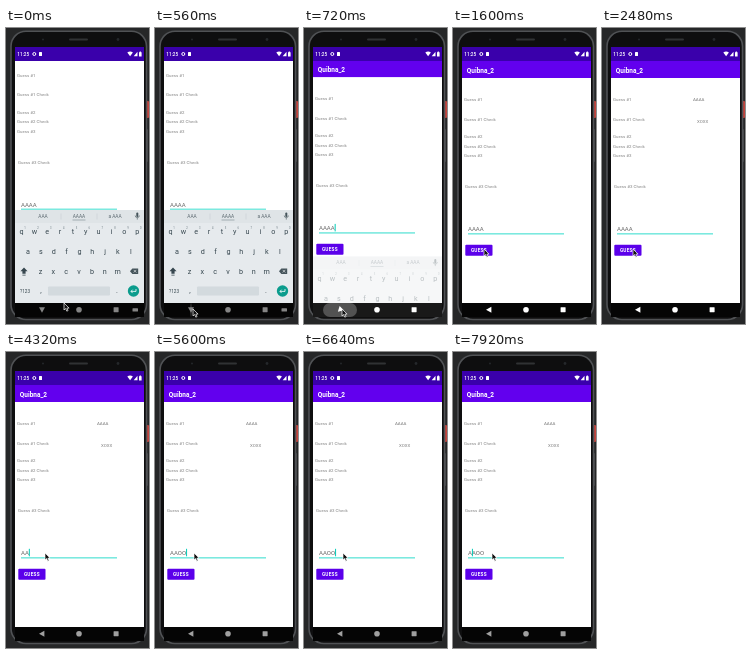
These frames come from a looping animation (143x296 px, 8 s). An HTML page:

```html
<!DOCTYPE html>
<html lang="en">
<head>
<meta charset="utf-8">
<title>Guessing app</title>
<style>
html, body { margin: 0; width: 100%; height: 100%; overflow: hidden; background: #262728; }
svg { display: block; width: 143px; height: 296px; font-family: Roboto, "Open Sans", sans-serif; }
text { white-space: pre; }
.label { font-size: 4.4px; fill: #808080; }
.key { font-size: 7.2px; fill: #37474f; text-anchor: middle; }
.hint { font-size: 2.6px; fill: #66757c; text-anchor: middle; }
.tip { font-size: 4.8px; fill: #546168; text-anchor: middle; }
</style>
</head>
<body>
<svg viewBox="0 0 143 296">
  <defs>
    <clipPath id="screen"><path d="M9 19H138V289H9Z"/></clipPath>
    <clipPath id="content"><path d="M9 33H138V275H9Z"/></clipPath>
    <clipPath id="buttonClip"><rect x="12.3" y="216.7" width="27.2" height="11" rx="1"/></clipPath>
  </defs>
  <rect width="143" height="296" fill="#262728"/>
  <rect x="139" y="73" width="4" height="17" rx="1" fill="#c5443d"/>
  <rect x="139" y="101" width="3" height="33" rx="1" fill="#46484a"/>
  <rect x="5" y="3.2" width="135.5" height="288.3" rx="15" fill="#0e0e0f" stroke="#505255" stroke-width="1.6"/>
  <rect x="63" y="10.5" width="19" height="2" rx="1" fill="#303234"/>
  <circle cx="37" cy="11.5" r="1" fill="#25282b"/>
  <circle cx="112" cy="11.5" r="1.4" fill="#25282b"/>

  <g clip-path="url(#screen)">
    <rect x="9" y="19" width="129" height="256" fill="#fff"/>
    <g clip-path="url(#content)">
      <g id="page">
        <rect x="9" y="31" width="129" height="19" fill="#6200ee"/>
        <text x="13.8" y="45" font-size="6.5" font-weight="700" fill="#fff">Quibna_2</text>
        <g id="labels"></g>
        <g id="answers">
          <text class="label" x="91" y="73.4">AAAA</text>
          <text class="label" x="95" y="94.9">XOXX</text>
        </g>
        <text id="entry" x="15" y="203" font-size="6" fill="#606060"></text>
        <rect id="caret" y="196.8" width="1" height="7.5" fill="#03cbb8"/>
        <rect x="15" y="205" width="96" height="1.6" fill="#7ce9df"/>
        <g clip-path="url(#buttonClip)">
          <rect x="12" y="216" width="29" height="13" fill="#5b00ea"/>
          <circle id="ripple" cx="31" cy="221" fill="#fff"/>
        </g>
        <text x="17.9" y="224" font-size="4.7" font-weight="700" letter-spacing=".25" fill="#fff">GUESS</text>
      </g>
      <g id="keyboard">
        <rect x="9" y="182" width="129" height="94" fill="#e6eaed"/>
        <rect x="9" y="182" width="129" height="13" fill="#dfe4e7"/>
        <path d="M55 185.5v6M91 185.5v6" stroke="#c3cacf" stroke-width=".5"/>
        <text class="tip" x="37" y="190">AAA</text>
        <text class="tip" x="73" y="190">AAAA</text>
        <text class="tip" x="109" y="190">a AAA</text>
        <path d="M66.5 192H79.5" stroke="#78868d" stroke-width=".6"/>
        <rect x="130.3" y="184.6" width="2" height="4.5" rx="1" fill="#45545b"/>
        <path d="M129.2 187.5a2.1 2.1 0 0 0 4.2 0M131.3 189.6v2" fill="none" stroke="#45545b" stroke-width=".6"/>
        <g id="keys"></g>
        <path d="M18 239.5l3.6 3.8h-2v2.5h-3.2v-2.5h-2zM16.4 246.7h3.2v.8h-3.2z" fill="#37474f"/>
        <path d="M124 243.2l2.4-2.7h5.8v5.4h-5.8z" fill="#45545b"/>
        <path d="M127.7 241.9l2.6 2.6m0-2.6l-2.6 2.6" stroke="#fff" stroke-width=".6"/>
        <text x="19" y="265" font-size="4.7" text-anchor="middle" fill="#37474f">?123</text>
        <text class="key" x="35" y="265">,</text>
        <rect x="42" y="258.5" width="62" height="9" rx="1" fill="#d3dade"/>
        <text class="key" x="111" y="265">.</text>
        <circle cx="127.5" cy="263" r="5.7" fill="#0b9c8d"/>
        <path d="M130 261v2.4h-5m1.6-1.7l-1.6 1.7 1.6 1.7" fill="none" stroke="#fff" stroke-width=".8"/>
      </g>
    </g>
    <rect x="9" y="19" width="129" height="14" fill="#3a00ab"/>
    <g fill="#fff">
      <text x="11.3" y="27.7" font-size="4.7" font-weight="500">11:25</text>
      <circle cx="28.3" cy="26" r="1.5" fill="none" stroke="#fff" stroke-width="1"/>
      <rect x="33" y="24" width="3" height="4" rx=".5"/>
      <path d="M121.3 24.4q2.8-1.9 5.6 0l-2.8 3.8zM127.7 28.2h3.8v-4.4zM133 24.2h.7v-.7h1.2v.7h.7v4.2h-2.6z"/>
    </g>
    <rect x="9" y="275" width="129" height="14" fill="#050505"/>
    <rect id="navFade" x="9" y="275" width="129" height="14" fill="#fff"/>
    <rect id="touch" y="275" height="14" rx="7" fill="#fff"/>
    <g id="nav">
      <path id="back" d="M33 281.7l5.4-3v6z"/>
      <circle cx="73" cy="281.7" r="2.8"/>
      <rect x="107.6" y="279.2" width="5" height="5" rx=".4"/>
      <rect id="switcher" x="126.5" y="280.2" width="5.5" height="3.4" rx=".5"/>
    </g>
  </g>
  <path id="pointer" d="M0 0V8.2L1.9 6.5 3.3 9.6 4.8 8.9 3.4 6H6Z" fill="#111" stroke="#fff" stroke-width=".8"/>
</svg>
<script>
const LOOP = 8000;
const PAN = 24.5;
const get = id => document.getElementById(id);
const ease = x => x * x * (3 - 2 * x);
const ramp = (t, from, to) => ease(Math.min(1, Math.max(0, (t - from) / (to - from))));

function addText(parent, cls, x, y, value) {
  const node = document.createElementNS("http://www.w3.org/2000/svg", "text");
  node.setAttribute("class", cls);
  node.setAttribute("x", x);
  node.setAttribute("y", y);
  node.textContent = value;
  parent.append(node);
}

[["Guess #1", 11, 73.4], ["Guess #1 Check", 11, 92.6], ["Guess #2", 11, 110],
 ["Guess #2 Check", 11, 119.5], ["Guess #3", 11, 129.4], ["Guess #3 Check", 12, 160.4]]
  .forEach(([value, x, y]) => addText(get("labels"), "label", x, y, value));

[["qwertyuiop", 15.5, 206.2], ["asdfghjkl", 22, 226.2], ["zxcvbnm", 34.5, 245.5]]
  .forEach(([row, left, y], r) => [...row].forEach((letter, i) => {
    const x = left + i * 12.85;
    addText(get("keys"), "key", x, y, letter);
    if (r === 0) addText(get("keys"), "hint", x + 3.6, y - 5.5, (i + 1) % 10);
  }));

// time, text, caret index
const edits = [
  [0, "AAAA", 4], [3000, "AAAA", 4], [3760, "AAA", 3], [4000, "AA", 2],
  [5200, "AAO", 3], [5600, "AAOO", 4],
  [7120, "AAOO", 3], [7400, "AAOO", 2], [7700, "AAOO", 1]
];

// time, x, y
const pointerPath = [
  [0, 58, 275], [160, 58, 275], [520, 38, 281], [800, 38, 281],
  [1440, 31, 221], [2640, 31, 221], [2960, 39, 201], [LOOP, 39, 201]
];

function pointerAt(t) {
  const i = pointerPath.findIndex(p => p[0] > t);
  const [t0, x0, y0] = pointerPath[i - 1], [t1, x1, y1] = pointerPath[i];
  const k = ramp(t, t0, t1);
  return [x0 + (x1 - x0) * k, y0 + (y1 - y0) * k];
}

function drawEntry(t) {
  const [start, value, index] = edits.filter(e => e[0] <= t).pop();
  const entry = get("entry");
  entry.textContent = value;
  const on = t < 3000 ? t % 1000 >= 620 : (t - start) % 1000 < 500;
  get("caret").setAttribute("x", 15 + entry.getSubStringLength(0, index));
  get("caret").setAttribute("visibility", on ? "visible" : "hidden");
}

function drawNav(t) {
  const open = t < 600;
  const turn = ramp(t, 580, 860);
  const reach = 17 * ramp(t, 540, 720);
  get("back").setAttribute("transform", `rotate(${-90 * (1 - turn)} 36 281.7)`);
  get("switcher").setAttribute("visibility", open ? "visible" : "hidden");
  get("nav").setAttribute("fill", open ? "#858585" : t < 3000 ? "#fff" : "#a0a0a0");
  get("navFade").setAttribute("opacity", open ? 0 : 0.12 * (1 - ramp(t, 600, 900)));
  get("touch").setAttribute("x", 36 - reach);
  get("touch").setAttribute("width", 2 * reach);
  get("touch").setAttribute("opacity", 0.25 * (1 - ramp(t, 700, 960)));
}

function draw(t) {
  const hide = ramp(t, 580, 860);
  const pan = PAN * (1 - ramp(t, 560, 742));
  get("page").setAttribute("transform", `translate(0 ${-pan})`);
  get("keyboard").setAttribute("transform", `translate(0 ${hide * 92})`);
  get("keyboard").setAttribute("opacity", Math.max(0, 1 - hide * 1.3));

  get("answers").setAttribute("visibility", t >= 2200 ? "visible" : "hidden");
  get("ripple").setAttribute("r", 22 * ramp(t, 2080, 2280));
  get("ripple").setAttribute("opacity", 0.25 * (1 - ramp(t, 2240, 2440)));

  drawNav(t);
  drawEntry(t);
  get("pointer").setAttribute("transform", `translate(${pointerAt(t).join(" ")}) scale(.85)`);
}

const began = performance.now();
function tick() {
  draw((performance.now() - began) % LOOP);
  requestAnimationFrame(tick);
}
tick();
</script>
</body>
</html>
```
